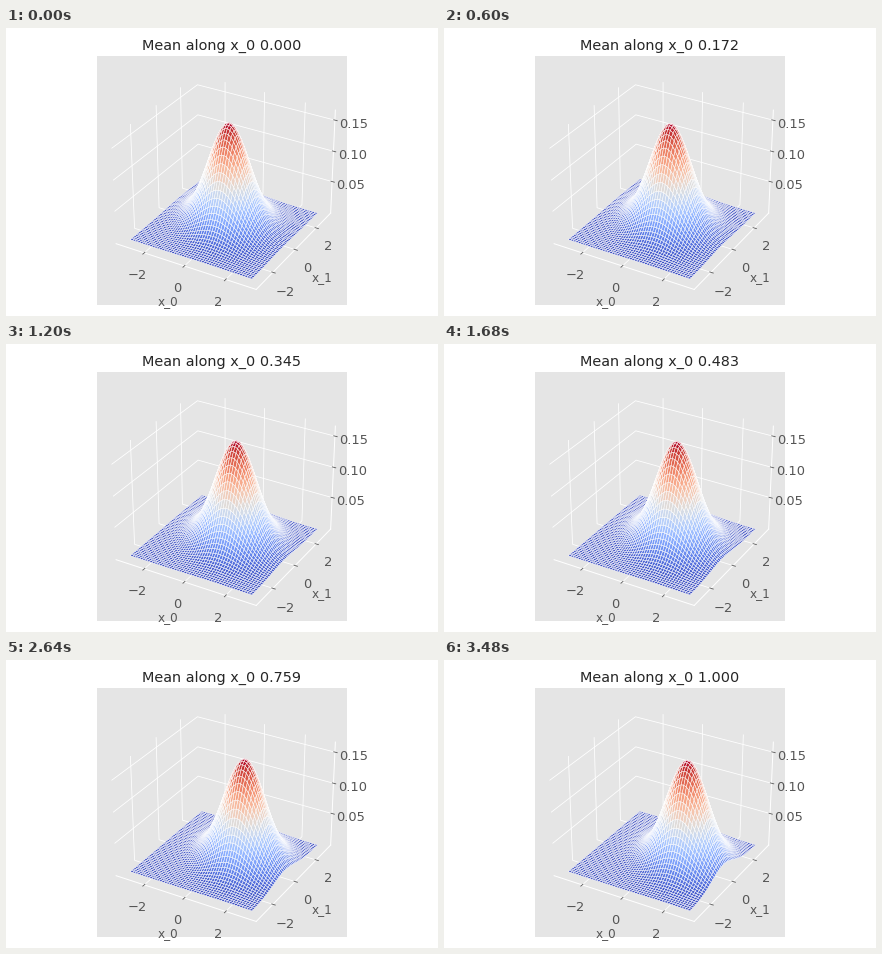
A matplotlib script that plays this animation: 432 by 288 pixels, repeating every 3600 ms.

```python
import numpy as np
import matplotlib.pyplot as plt
from matplotlib.animation import FuncAnimation

W, H, DPI = 432, 288, 72
FRAMES, INTERVAL = 30, 120
MEAN_Y, RHO = 0.3, -0.2
PEAK = 1 / (2 * np.pi * np.sqrt(1 - RHO ** 2))

plt.rcParams.update({
    "font.family": "DejaVu Sans",
    "axes.facecolor": "#E5E5E5",
    "axes.edgecolor": "white",
    "axes.linewidth": 1,
    "axes.labelcolor": "#555555",
    "axes.labelsize": 12,
    "xtick.color": "#555555",
    "ytick.color": "#555555",
    "xtick.labelsize": 13,
    "ytick.labelsize": 13,
    "grid.color": "white",
    "grid.linewidth": 0.8,
    "lines.linewidth": 1,
})

fig = plt.figure(figsize=(W / DPI, H / DPI), dpi=DPI, facecolor="white")
side = 249.4
ax = fig.add_axes([(W - side) / 2 / W, 10.8 / H, side / W, side / H],
                  projection="3d")
ax.view_init(elev=30, azim=-60)


def padded(lo, hi):
    pad = (hi - lo) / 48
    return lo - pad, hi + pad


ax.set_xlim(*padded(-3.3, 3.3))
ax.set_ylim(*padded(-3.3, 3.3))
ax.set_zlim(*padded(0, PEAK))
ax.set_xticks([-2, 0, 2])
ax.set_yticks([-2, 0, 2])
ax.set_zticks([0.05, 0.10, 0.15])
ax.set_zticklabels(["0.05", "0.10", "0.15"])
ax.set_xlabel("x_0")
ax.set_ylabel("x_1")
for axis in (ax.xaxis, ax.yaxis, ax.zaxis):
    axis.set_pane_color((1, 1, 1, 0))

grid = np.linspace(-3, 3, 50)
X, Y = np.meshgrid(grid, grid)
means = np.linspace(0, 1, FRAMES)


def density(mean_x):
    dx, dy = X - mean_x, Y - MEAN_Y
    q = (dx ** 2 - 2 * RHO * dx * dy + dy ** 2) / (1 - RHO ** 2)
    return PEAK * np.exp(-q / 2)


def update(i):
    for old in list(ax.collections):
        old.remove()
    ax.plot_surface(X, Y, density(means[i]), rstride=1, cstride=1,
                    cmap="coolwarm", edgecolor="white", linewidth=0.5)
    # 3D axes scale the title height by 0.92, so undo that
    ax.set_title(f"Mean along x_0 {means[i]:.3f}", fontsize=14.4,
                 color="#262626", y=1 / 0.92, pad=6)
    return []


anim = FuncAnimation(fig, update, frames=FRAMES, init_func=lambda: [],
                     interval=INTERVAL, repeat=True, repeat_delay=0)
plt.show()
```
